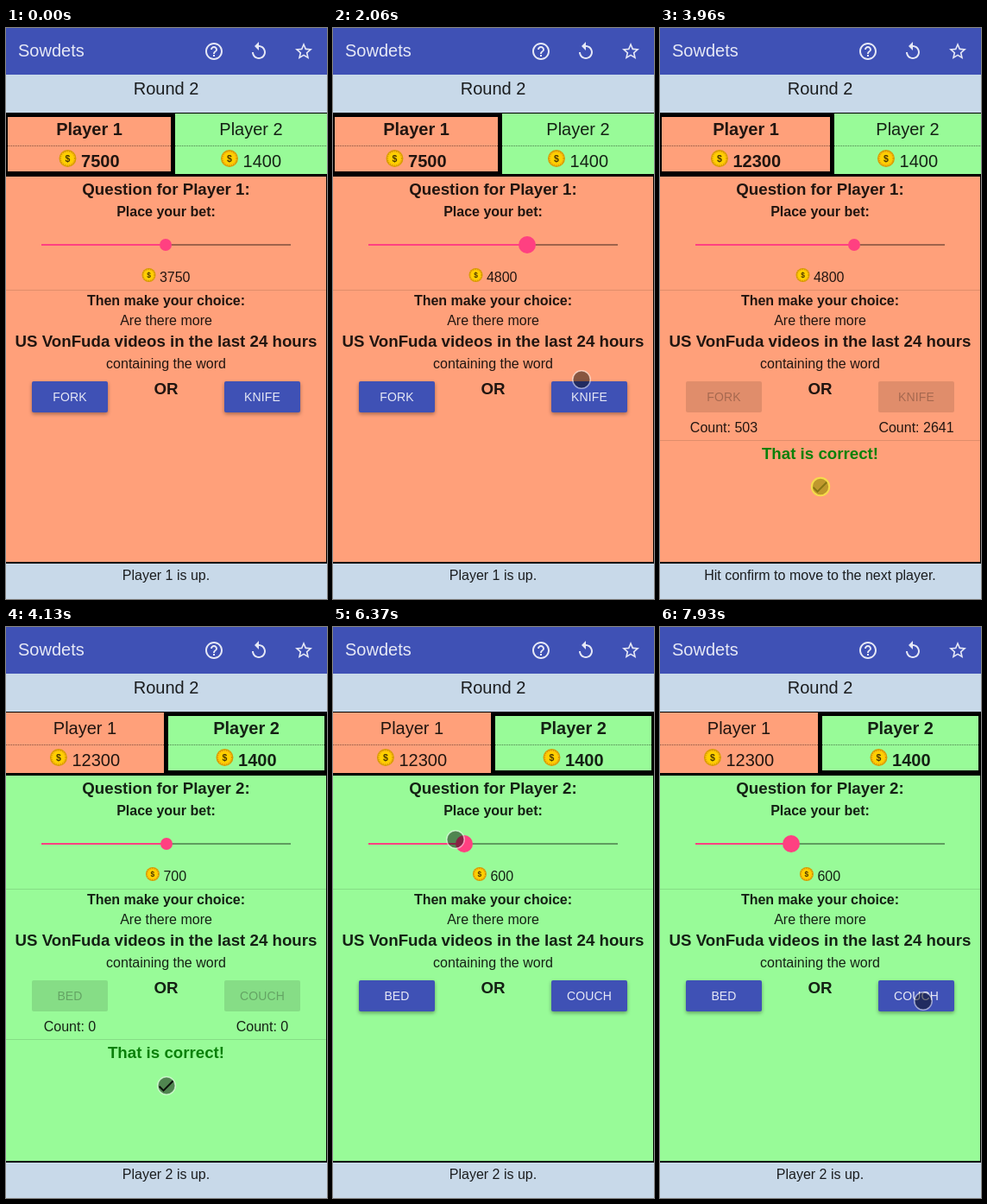
An HTML page with a canvas for the animation above (8 s loop, 372 px wide and 661 px high).

```html
<!DOCTYPE html>
<html lang="en">
<head>
<meta charset="utf-8">
<title>Quiz round</title>
<style>
html, body { margin: 0; width: 100%; height: 100%; overflow: hidden; background: #c8d9e9; }
canvas { display: block; }
</style>
</head>
<body>
<canvas id="stage" width="372" height="661"></canvas>
<script>
const ctx = document.getElementById('stage').getContext('2d');
const LOOP = 8000, TICK = 172;
const SALMON = '#ffa07a', GREEN = '#98fb98', BLUE = '#c8d9e9', INDIGO = '#3f51b5', PINK = '#ff4081';
const INK = 'rgba(0,0,0,.87)', PALE = 'rgba(255,255,255,.87)';
const MID = 185.5;

const icons = {
  help: 'M11 18h2v-2h-2v2zm1-16C6.48 2 2 6.48 2 12s4.48 10 10 10 10-4.48 10-10S17.52 2 12 2zm0 18c-4.41 0-8-3.59-8-8s3.59-8 8-8 8 3.59 8 8-3.59 8-8 8zm0-14c-2.21 0-4 1.79-4 4h2c0-1.1.9-2 2-2s2 .9 2 2c0 2-3 1.75-3 5h2c0-2.25 3-2.5 3-5 0-2.21-1.79-4-4-4z',
  replay: 'M12 5V1L7 6l5 5V7c3.31 0 6 2.69 6 6s-2.69 6-6 6-6-2.69-6-6H4c0 4.42 3.58 8 8 8s8-3.58 8-8-3.58-8-8-8z',
  star: 'M22 9.24l-7.19-.62L12 2 9.19 8.63 2 9.24l5.46 4.73L5.82 21 12 17.27 18.18 21l-1.63-7.03L22 9.24zM12 15.4l-3.76 2.27 1-4.28-3.32-2.88 4.38-.38L12 6.1l1.71 4.04 4.38.38-3.32 2.88 1 4.28L12 15.4z',
  check: 'M9 16.17L4.83 12l-1.42 1.41L9 19 21 7l-1.41-1.41z'
};

// Pointer stops: tick, x, y
const route = [
  [1, 242, 571], [3, 236, 470], [5, 218, 320], [6, 216, 268], [7, 224, 254],
  [9, 224, 254], [10, 232, 276], [11, 264, 352], [12, 288, 407], [13, 297, 425],
  [18, 297, 425], [19, 288, 436], [20, 250, 478], [21, 208, 518], [22, 186, 531],
  [28, 186, 531], [29, 186, 510], [30, 184, 425], [31, 178, 325], [32, 169, 264],
  [33, 152, 248], [34, 142, 246], [39, 142, 246], [40, 148, 259], [41, 169, 287],
  [42, 220, 327], [43, 264, 375], [44, 294, 415], [45, 304, 431], [46, 305, 433]
];
const isPressed = k => k === 8 || k === 13 || k === 23 || k === 34;

function box(color, x, y, w, h) {
  ctx.fillStyle = color;
  ctx.fillRect(x, y, w, h);
}

function disc(color, x, y, r) {
  ctx.fillStyle = color;
  ctx.beginPath();
  ctx.arc(x, y, r, 0, Math.PI * 2);
  ctx.fill();
}

function text(str, x, y, { size = 16, bold = false, color = INK, align = 'center', gap = 0 } = {}) {
  ctx.font = `${bold ? 'bold ' : ''}${size}px "Liberation Sans", Arial, sans-serif`;
  ctx.letterSpacing = gap + 'px';
  ctx.textAlign = align;
  ctx.fillStyle = color;
  ctx.fillText(str, x, y);
}

const heading = (str, y, color) => text(str, MID, y, { size: 18.72, bold: true, color });

function icon(name, x, y, color) {
  ctx.save();
  ctx.translate(x - 12, y - 12);
  ctx.fillStyle = color;
  ctx.fill(new Path2D(icons[name]));
  ctx.restore();
}

function coin(x, y, r) {
  disc('#d79a00', x, y, r);
  disc('#ffc20a', x, y, r * .88);
  ctx.setLineDash([1, 1.5]);
  ctx.strokeStyle = '#b98300';
  ctx.lineWidth = 1;
  ctx.beginPath();
  ctx.arc(x, y, r * .82, 0, Math.PI * 2);
  ctx.stroke();
  ctx.setLineDash([]);
  disc('#ffd000', x, y, r * .68);
  text('$', x, y + r * .37, { size: r * 1.05, bold: true, color: '#4a3600' });
}

// Coin and amount, centred together
function amount(value, cx, base, size, r, bold) {
  ctx.font = `${bold ? 'bold ' : ''}${size}px "Liberation Sans", Arial, sans-serif`;
  ctx.letterSpacing = '0px';
  const space = size * .278;
  const left = cx - (2 * r + space + ctx.measureText(value).width) / 2;
  coin(left + r, base - (r > 9 ? 10 : 8), r);
  text(value, left + 2 * r + space, base, { size, bold, align: 'left' });
}

function cell(name, score, color, x0, x1, active) {
  const top = active ? 103 : 99, bottom = active ? 166 : 169, cx = (x0 + x1) / 2;
  box(color, x0, top, x1 - x0, bottom - top);
  ctx.strokeStyle = 'rgba(0,0,0,.5)';
  ctx.lineWidth = 1;
  ctx.setLineDash([1, 1]);
  ctx.beginPath();
  ctx.moveTo(x0, 136.5);
  ctx.lineTo(x1, 136.5);
  ctx.stroke();
  ctx.setLineDash([]);
  text(name, cx, 124, { size: 20, bold: active });
  amount(score, cx, 161, 20, 10, active);
}

function header(second, score) {
  box('#000', 0, 98, 372, 74);
  const edge = second ? 183 : score > 9999 ? 197 : 191;
  cell('Player 1', String(score), SALMON, second ? 0 : 2, edge, !second);
  cell('Player 2', '1400', GREEN, edge + 5, second ? 369 : 372, second);
}

function slider(x, r, bet) {
  box('rgba(0,0,0,.38)', x, 250, 330 - x, 2);
  box(PINK, 41, 250, x - 41, 2);
  disc(PINK, x, 251, r);
  amount(String(bet), MID, 294, 16, 8, false);
}

function plate(x, color) {
  ctx.fillStyle = color;
  ctx.beginPath();
  ctx.roundRect(x, 409, 88, 36, 2);
  ctx.fill();
}

function button(label, x, on) {
  const face = color => text(label, x + 44, 432, { size: 14, gap: .14, color });
  if (on < 1) {
    ctx.globalAlpha = 1 - on;
    plate(x, 'rgba(0,0,0,.12)');
    face('rgba(0,0,0,.26)');
  }
  if (on > 0) {
    ctx.save();
    ctx.globalAlpha = on;
    ctx.shadowColor = 'rgba(0,0,0,.35)';
    ctx.shadowBlur = 4;
    ctx.shadowOffsetY = 2;
    plate(x, INDIGO);
    ctx.restore();
    ctx.globalAlpha = on;
    face(PALE);
  }
  ctx.globalAlpha = 1;
}

function result(counts, alpha) {
  ctx.globalAlpha = alpha;
  text('Count: ' + counts[0], 74, 468);
  text('Count: ' + counts[1], 297, 468);
  box('rgba(0,0,0,.12)', 0, 477, 371, 1);
  heading('That is correct!', 499, '#0a800a');
  icon('check', MID, 531, INK);
  ctx.globalAlpha = 1;
}

function pointer(k) {
  if (k < route[0][0]) return;
  let i = 0;
  while (i < route.length - 2 && route[i + 1][0] <= k) i++;
  const [k0, x0, y0] = route[i], [k1, x1, y1] = route[i + 1];
  const p = Math.min(1, (k - k0) / (k1 - k0));
  const x = x0 + (x1 - x0) * p, y = y0 + (y1 - y0) * p, down = isPressed(k);
  disc(down ? 'rgba(170,150,20,.75)' : 'rgba(0,0,0,.47)', x, y, 10);
  ctx.strokeStyle = down ? '#f5dc4b' : 'rgba(255,255,255,.5)';
  ctx.lineWidth = down ? 2 : 1.6;
  ctx.beginPath();
  ctx.arc(x, y, 10.2, 0, Math.PI * 2);
  ctx.stroke();
}

function draw(k) {
  const second = k >= 24, answered = k >= 15 && !second;
  const n = second ? 2 : 1;

  box(BLUE, 0, 0, 372, 661);
  box(INDIGO, 0, 0, 372, 54);
  text('Sowdets', 14, 33, { size: 20, color: PALE, align: 'left' });
  icon('help', 241, 27, PALE);
  icon('replay', 293, 27, PALE);
  icon('star', 345, 27, PALE);
  text('Round 2', MID, 77, { size: 20 });

  box('#000', 0, 170, 372, 450);
  header(second, k >= 15 ? 12300 : 7500);
  box(second ? GREEN : SALMON, 0, 172, 371, 446);

  heading(`Question for Player ${n}:`, 193);
  text('Place your bet:', MID, 218, { bold: true });
  if (second) {
    const moved = k >= 34;
    const x = moved ? 152 : k === 24 ? 186 : k === 25 ? 178 : 174;
    slider(x, moved ? 10 : 7, moved ? 600 : 700);
  } else {
    const moved = k >= 8;
    slider(moved ? 225 : 185, moved && k < 14 ? 10 : 7, moved ? 4800 : 3750);
  }
  box('rgba(0,0,0,.12)', 0, 303, 371, 1);

  text('Then make your choice:', MID, 321, { bold: true });
  text('Are there more', MID, 344);
  heading('US VonFuda videos in the last 24 hours', 369);
  text('containing the word', MID, 394);
  heading('OR', 424);

  const on = second ? (k === 24 ? 0 : k === 25 ? .6 : 1) : k < 14 ? 1 : 0;
  button(second ? 'BED' : 'FORK', 30, on);
  button(second ? 'COUCH' : 'KNIFE', 253, on);

  if (answered) result([503, 2641], 1);
  if (second && on < 1) result([0, 0], 1 - on);

  text(answered ? 'Hit confirm to move to the next player.' : `Player ${n} is up.`, MID, 639);
  pointer(k);
}

function play(now) {
  draw(Math.floor((now % LOOP + 15) / TICK));
  requestAnimationFrame(play);
}
const start = performance.now();
requestAnimationFrame(function loop() {
  play(Math.max(0, performance.now() - start));
});
</script>
</body>
</html>
```
